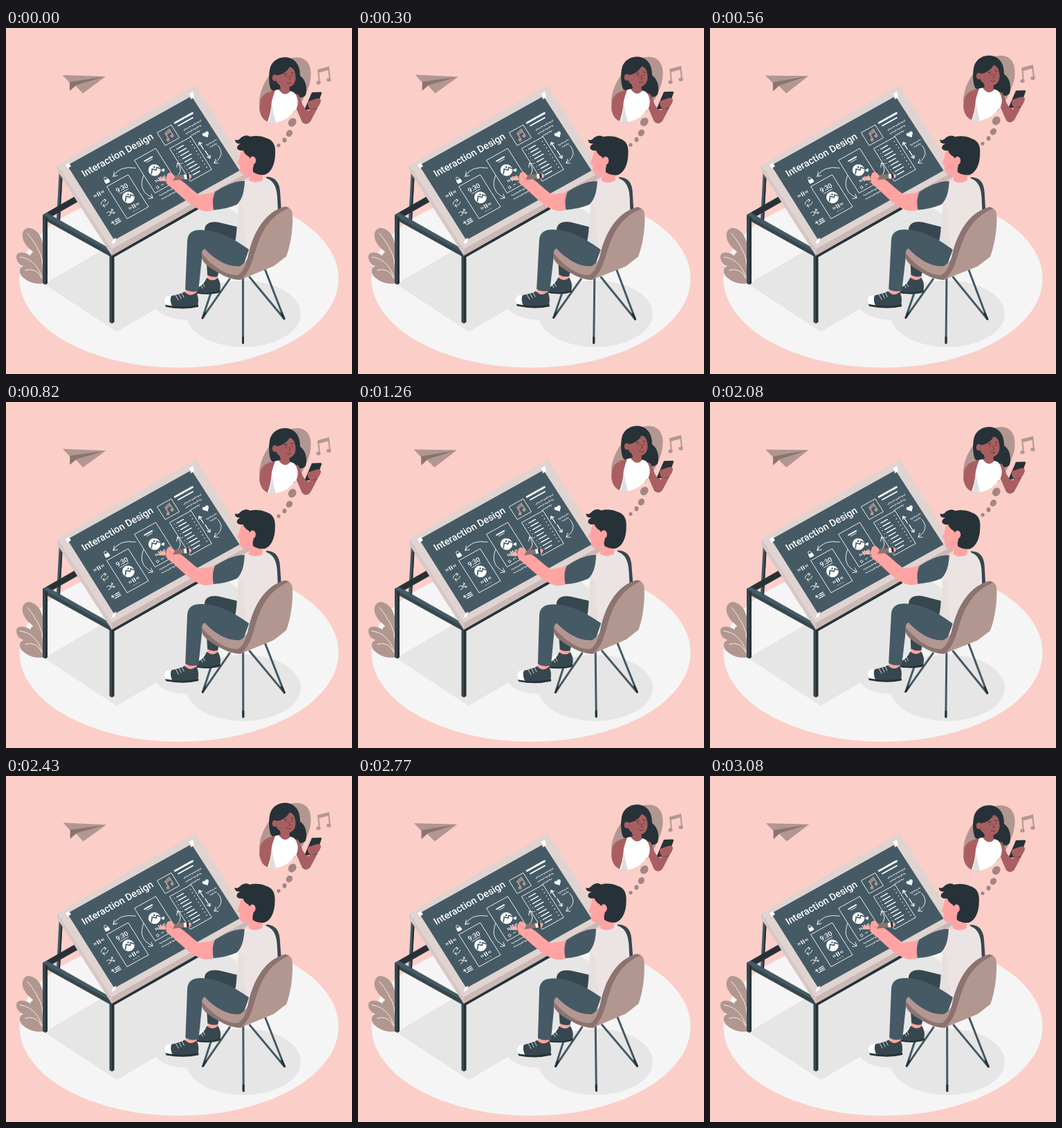
An HTML page that plays this animation: 500 px wide and 500 px high, repeating every 3.12 s.

```html
<!DOCTYPE html>
<html lang="en">
<head>
<meta charset="utf-8">
<title>Interaction Design</title>
<style>
html, body { margin: 0; width: 100%; height: 100%; overflow: hidden; background: #fccec8; }
svg { display: block; width: 100vw; height: 100vh; }
text { font-family: Roboto, Inter, sans-serif; fill: #fff; }
.ink { fill: #263238; }
.slate { fill: #455a64; }
.deep { fill: #37474f; }
.rose { fill: #b29791; }
.rose-dark { fill: #8c736f; }
.skin { fill: #ffa4a2; }
.brown { fill: #a95f61; }
.shade { fill: #e6e6e6; }
.white { fill: #fff; }
.line { fill: none; stroke: #fff; stroke-width: .8; stroke-linecap: round; stroke-linejoin: round; }
</style>
</head>
<body>
<svg viewBox="0 0 500 500">
  <rect width="500" height="500" fill="#fccec8"/>
  <ellipse cx="250" cy="362" rx="230.500" ry="129" fill="#f5f5f5"/>
  <g class="shade">
    <path d="M55 370L160 439L390 305L285 236Z"/>
    <ellipse cx="262" cy="400" rx="46" ry="22"/>
    <ellipse cx="343" cy="413" rx="83" ry="48"/>
  </g>

  <g id="plant">
    <path class="rose" d="M53 337C48 328 32 321 26 309C21 298 25 289 33 289C45 290 54 303 54 320Z"/>
    <path class="rose" d="M53 369C43 371 31 367 23 359C18 353 19 346 25 344C17 341 13 333 16 327C20 322 30 325 35 329C37 322 45 322 49 329C53 335 54 352 53 369Z"/>
    <path class="line" d="M31 297Q46 314 53 336M20 331Q42 333 52 360M28 350Q44 345 52 362"/>
  </g>

  <g id="frame">
    <path class="slate" d="M77 204L82 208L78 279L73 277Z"/>
    <path class="ink" d="M80 204L82 208L78 279L76 278Z"/>
    <path class="ink" d="M53 270L100 243L104 251L60 276Z"/>
    <path class="slate" d="M53 270L59 267L156 322L151 326Z"/>
    <path class="deep" d="M53 270L152 325V331L53 276Z"/>
    <path class="deep" d="M53 271L57 273V371L53 369Z"/>
    <path class="ink" d="M57 273L60 274V369L57 371Z"/>
    <path class="ink" d="M152 324L278 254V262L153 333Z"/>
    <path class="deep" d="M149.500 324L153 326V427L149.500 425Z"/>
    <path class="ink" d="M153 326L156.500 324V425L153 427Z"/>
  </g>

  <g id="board">
    <path fill="#cbb9b6" d="M74 198L153 319L352 207V215L153 329Z"/>
    <path fill="#d6c8c5" d="M74 198L153 319V329L74 206Z"/>
    <path fill="#e0d4d1" d="M74 198L274 82L352 207L153 319Z"/>
    <path class="slate" d="M88.500 198.500L268 98.500L337.500 206L156.500 306.500Z"/>
    <path class="white" d="M86 198L91 195L94 200L89 203ZM265 95L270 92L272 100L267 103ZM154 306L159 303L158 310L153 312Z"/>
    <g id="screen" transform="matrix(.875 -.485 .534 .845 90 198)">
      <text x="10" y="26.500" font-size="14.200" font-weight="500">Interaction Design</text>
      <g class="line">
        <rect x="30.800" y="54.300" width="35" height="55"/>
        <rect x="84.900" y="40.400" width="35" height="56"/>
        <rect x="137" y="50.300" width="35" height="56"/>
        <rect x="134" y="21.400" width="23" height="22"/>
        <path stroke-width="2.800" d="M163 21.500H192"/>
        <path stroke-width="1.800" d="M165 27.500H189M96 48.500H109"/>
        <path d="M98 51.500H107M41 72.500H55M44 104.500H45M48 104.500H49M52 104.500H53"/>
        <path d="M80 51Q62 36 46 46M51 41L46 46L52 48"/>
        <path d="M84 66Q64 82 78 101M72 99L78 101L79 95"/>
        <path d="M123 91Q137 89 135 74M131 79L135 74L139 78"/>
        <path d="M198 80Q201 98 180 100M185 96L180 100L185 103"/>
        <path stroke-width="1.200" d="M177.500 75V63M175 66.500L177.500 63L180 66.500M178.500 78V91M176 87.500L178.500 91L181 87.500"/>
        <path d="M10 73Q12 69 17 69.500L19 71M17.500 68.500L19 71L16 72.500M20 75Q18 78 13 77L11 75.500M13.500 75L11 75.500L12 79"/>
        <path d="M10 87.500H13L18 92.500H20M10 92.500H13L18 87.500H20M18.500 86L20 87.500L18.500 89M18.500 91L20 92.500L18.500 94"/>
        <path stroke-width="1.200" d="M14 103H21M14 105.500H21M11 108H21M8 104H12M10 102V106"/>
        <path d="M33 45V43Q35 39 37 43V45"/>
        <circle cx="92" cy="91" r="1.800"/><path d="M98 91H102M106 91H112"/>
      </g>
      <rect class="white" x="31.500" y="45" width="7" height="5.500" rx=".8"/>
      <text x="48" y="70" font-size="9.500" font-weight="500" text-anchor="middle">9:30</text>
      <path class="white" d="M192 63L187.500 58C186 54 191 53 192 56C193 53 198 54 196.500 58Z"/>
      <path class="white" d="M112 76L109.500 73C109 71 111.500 70.500 112 72C112.500 70.500 115 71 114.500 73Z"/>
      <g fill="none" stroke="#b29791" stroke-width="1.800"><path d="M143 38V28L151 26V36M143 30.500L151 28.500"/></g>
      <g class="rose"><circle cx="141.500" cy="38" r="2.400"/><circle cx="149.500" cy="36" r="2.400"/></g>
    </g>
  </g>

  <g id="sitter">
    <g fill="none" stroke="#455a64" stroke-width="3" stroke-linecap="round">
      <path d="M323 363L284 419M307 350L285 416M342.500 360V455M352 360L401 419M374 348L402 420"/>
      <path stroke="#263238" d="M288 412L284 419M342.500 447V455M398 412L402 420"/>
    </g>
    <path class="skin" d="M291 354H306V368H291Z"/>
    <path class="deep" d="M290 361Q299 368 306 361C311 369 310 375 309 381Q295 387 272 383L276 376Q286 371 290 361Z"/>
    <path class="ink" d="M272 381Q295 385 309.500 379V382Q295 387 272 383Z"/>
    <path class="line" stroke-width="1.400" d="M284 368L287 374M281 371L284 376"/>
    <path class="deep" d="M287 290C289 281 298 279 308 281L345 290L331 318L308 320L306 359Q298 361 291 357Z"/>
    <path class="deep" d="M376 215C389 215 395 223 396 236L398 266L380 270Z"/>
    <path fill="#ebe4e2" d="M340 222L372 216C384 218 391 226 392 244L393 265L374 300L352 322L329 316C335 300 333 280 336 254Z"/>
    <path fill="#ded3d1" d="M337 252L344 263Q341 290 348 313L331 314Q335 288 337 252Z" opacity=".3"/>
    <path class="skin" d="M260 375L276 377L275 388Q267 390 259 386Z"/>
    <path class="deep" d="M258 381Q266 390 275 382C279 390 278 396 277 402Q257 408 231 401Q227 395 232 389L244 386Q253 384 258 381Z"/>
    <path class="white" d="M239 386.500Q236 393 240 402L231 401Q226 394 232 388Z"/>
    <path class="ink" d="M230 400Q253 405 278 400V403Q256 408 231 403Z"/>
    <path class="line" stroke-width="1.600" d="M245 386L249 393M250 385L253 391M254 383L257 389"/>
    <path class="slate" d="M262 307C263 294 273 291 285 292C307 293 327 303 351 320L341 349L310 345L284 324L278 380Q267 383 259 378Z"/>
    <path class="rose" d="M404 258Q414 260 414 270C415 294 410 318 405 330L387 344L338 364Q327 364 308 354C292 345 282 337 283 326Q283 321 287 319C301 334 320 346 338 344C355 335 355 309 370 287C381 271 392 260 404 258Z"/>
    <path class="rose-dark" d="M404 258L409 260C386 270 374 286 366 306C357 328 356 350 339 364Q323 364 306 353C288 343 281 336 283 326C300 346 319 358 335 357C350 348 348 326 357 305C367 281 382 263 404 258Z"/>
    <path class="skin" d="M353 203L371 207L371 220Q359 226 351 220Z"/>
    <path class="skin" d="M342 175C338 180 339 187 335 194Q334 197 338 198L338 205Q339 212 346 212Q354 213 361 207L361 178Z"/>
    <path class="ink" d="M338 177C331 175 334 169 339 167Q331 168 331 161Q335 164 340 158Q347 153 353 157C360 155 370 156 376 159C387 162 390 171 389 182C389 197 383 209 374 212Q364 213 357 208Q356 203 358 198L353 189Q351 185 348 184Q344 181 343 177Z"/>
    <ellipse class="skin" cx="356.500" cy="191.500" rx="4.600" ry="6"/>

    <path class="skin" d="M305 237L279 241C266 232 257 221 246 216L238 209Q233 210 235 214L231 219L233 226L243 234C257 247 272 262 288 265Q297 265 306 262Z"/>
    <path class="skin" d="M221 217Q227 214 235 217L234 222Q226 219 222 221Z"/>
    <g id="pencil">
      <path fill="#f0b9a9" d="M218 221L231 215L231 221.500Z"/>
      <path class="rose-dark" d="M230 215L258 211.800L259 218.500L231 221.500Z"/>
      <path class="white" d="M257 212L261 211.500L262 218.200L258 218.500Z"/>
      <path class="ink" d="M261 211.500L264 211.300L265 218L262 218.200Z"/>
      <path class="skin" d="M264 211.300Q268 211 268 214.500Q268 217.500 265 218Z"/>
    </g>
    <path class="skin" d="M233 211Q237 207 241 211L244 215L241 221L235 224L231 220Z"/>
    <path d="M236 216Q241 218 243 223" fill="none" stroke="#ec827e" stroke-width=".7"/>
    <path class="slate" d="M345 221C329 221 314 229 302 237Q297 248 300 263Q318 262 334 255C342 246 344 237 345 221Z"/>
  </g>

  <g id="thought">
    <clipPath id="bubble"><path d="M360 30H470V145H424L418 118Q410 132 391 137C374 139 365 128 366 109C369 85 370 60 400 30Z"/></clipPath>
    <path class="rose" d="M366 110C365 84 387 51 414 43C437 39 444 57 439 79C430 110 413 131 391 137C375 139 367 128 366 110Z"/>
    <g clip-path="url(#bubble)">
      <path class="ink" d="M384 90C379 84 379 62 383 54C389 43 402 40 412 44C421 48 425 57 425 69C433 75 436 86 433 97C425 105 413 99 408 91Q396 96 384 90Z"/>
      <path class="brown" d="M385 91L397 88L395 79L409 82L410 92L422 96C427 101 426 109 432 116L438 120L444 106Q449 99 455 105L450 116L440 135Q434 142 428 136L418 113L385 140L362 145L368 103Q373 93 385 91Z"/>
      <path class="white" d="M384 106Q386 98 389 90L394 89Q403 101 411 91L416 93C421 98 423 106 421 113C418 125 409 132 400 140H376Q383 125 384 106Z"/>
      <path fill="#dedede" d="M384 108Q386 124 391 140H378Q384 124 384 108Z"/>
    </g>
    <path class="brown" d="M390 69Q404 67 410 56Q417 58 418 67C420 77 416 84 408 86Q398 87 391 78Z"/>
    <ellipse class="brown" cx="388.500" cy="72" rx="3.800" ry="4.800"/>
    <g fill="none" stroke="#263238" stroke-width=".9" stroke-linecap="round">
      <path d="M402 67l4-1M412 64l3 1M405 69v1.500M413 68v1.500"/>
      <path d="M409 70L411 74L409 75M406 79Q409 81 412 79" stroke="#5f302f"/>
    </g>
    <path class="ink" d="M442 93L455 92.500Q457 94 455.500 96L448 117L434 118Q431 117 433 114Z"/>
    <path class="brown" d="M437 106L446 103Q454 100 455 105Q454 112 448 116L440 118Q434 112 437 106Z"/>
    <g class="rose-dark" fill-opacity=".8">
      <ellipse cx="414" cy="136.500" rx="5.500" ry="6.500" transform="rotate(35 414 136)"/>
      <ellipse cx="409.500" cy="152" rx="4.300" ry="5.200" transform="rotate(35 409 152)"/>
      <ellipse cx="402.500" cy="162" rx="3" ry="3.400"/>
      <circle cx="394" cy="169.500" r="2.600"/>
    </g>
    <path class="rose" d="M450 60L467 55.500L469 74H467L465.500 61L452.500 64.500L454 79H452Z"/>
    <g class="rose"><ellipse cx="451.500" cy="79" rx="3.200" ry="2.700"/><ellipse cx="466.500" cy="75" rx="3.200" ry="2.700"/></g>
  </g>

  <g id="plane">
    <path id="trail" d="M80 92C52 104 48 146 82 167" fill="none" stroke="#e6dad7" stroke-width="1.300" stroke-dasharray="6 4"/>
    <path class="rose" d="M81.500 68L144 70L92 79Z"/>
    <path class="rose-dark" d="M92 78L144 70L100 84L92 91Z"/>
    <path class="rose" d="M100 83L144 70L111 94.500Z"/>
  </g>
</svg>
<script>
const LOOP = 3120;
const byId = id => document.getElementById(id);
const screen = byId('screen');

function add(tag, attrs) {
  const el = document.createElementNS('http://www.w3.org/2000/svg', tag);
  for (const key in attrs) el.setAttribute(key, attrs[key]);
  screen.append(el);
}
const stroke = (d, width) => add('path', { d, class: 'line', style: `stroke-width:${width}` });

// Loose handwriting along one row
function scribble(x, y, length) {
  let d = `M${x} ${y}`;
  for (let i = 1; i < length / 1.2; i++) {
    const rise = Math.sin(i * 2.3 + y) * (0.5 + Math.abs(Math.sin(i * 0.7)));
    d += `L${(x + i * 1.2).toFixed(2)} ${(y + rise).toFixed(2)}`;
  }
  stroke(d, 0.6);
}
[[168, 37, 29], [168, 43, 26], [171, 49, 18], [184, 72, 18], [187, 77, 11],
 [88, 103, 32], [88, 109, 25]].forEach(row => scribble(...row));

// Cover pictures
for (const [x, y] of [[48.5, 83.3], [101.5, 67]]) {
  add('circle', { cx: x, cy: y, r: 8.6, class: 'white' });
  add('path', {
    d: `M${x - 7} ${y + 3}l5-6 4 4 3-3 3 4`,
    fill: 'none', stroke: '#455a64', 'stroke-width': 1.6
  });
  add('circle', { cx: x + 2, cy: y - 4, r: 1.3, class: 'slate' });
}

// Player buttons
for (const [x, y] of [[15, 58], [48.5, 98], [102, 82]]) {
  stroke(`M${x - 1.5} ${y - 2.5}v5M${x + 1.5} ${y - 2.5}v5`, 1.4);
  for (const side of [-1, 1]) {
    for (const gap of [5.5, 7.8]) {
      stroke(`M${x + side * gap} ${y - 1.3}l${-side * 1.3} 1.3 ${side * 1.3} 1.3`, 0.8);
    }
  }
}

// Track list
for (let i = 0; i < 9; i++) {
  const y = 56 + i * 5.5;
  stroke(`M141 ${y}h.5M167 ${y}h1`, 1);
  stroke(`M145 ${y}h${11 + i * 5 % 4}`, 1.4);
}

function draw() {
  const turn = performance.now() % LOOP / LOOP * 2 * Math.PI;
  const lift = (1 - Math.cos(turn)) / 2;
  const sway = 0.7 * Math.sin(turn * 2);
  const flutter = 1.6 * Math.sin(turn * 4);
  byId('thought').setAttribute('transform', `translate(0 ${-8.5 * lift})`);
  byId('sitter').setAttribute('transform', `rotate(${sway} 330 300)`);
  byId('plane').setAttribute('transform', `rotate(${flutter} 112 124)`);
  byId('trail').setAttribute('stroke-dashoffset', -8 * lift);
  requestAnimationFrame(draw);
}
draw();
</script>
</body>
</html>
```
